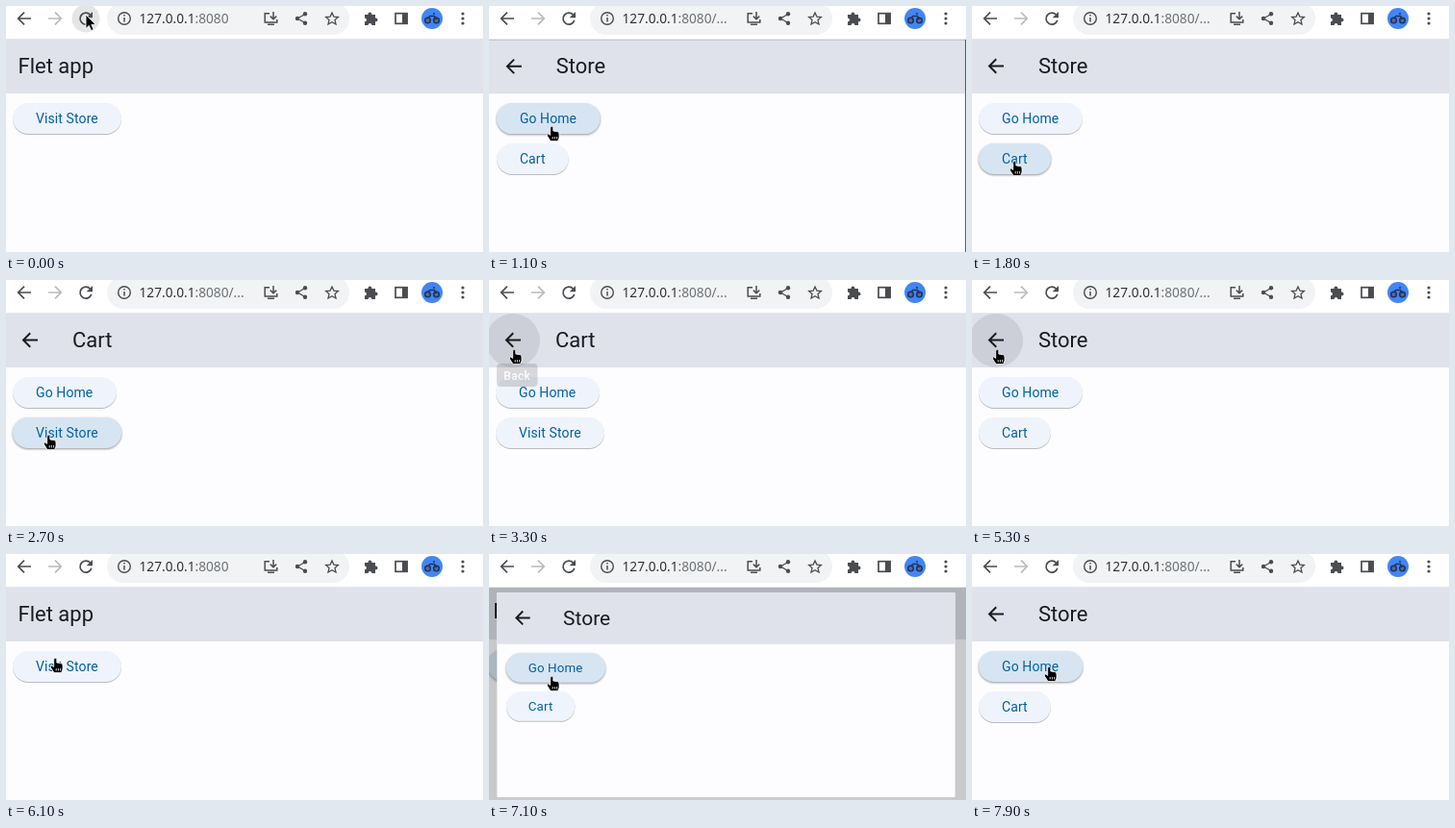
Recreate the animation shown at these times as an HTML page. Size 496x256 px, loop 8000 ms.

```html
<!DOCTYPE html>
<html lang="en">
<head>
<meta charset="utf-8">
<title>Routing demo</title>
<style>
  html, body { margin: 0; width: 100%; height: 100%; overflow: hidden; background: #fdfcff; }
  svg { display: block; }
  text { white-space: pre; }
  .title { font: 22px Roboto, sans-serif; fill: #1b1b1f; }
  .label { font: 14px Roboto, sans-serif; letter-spacing: .1px; fill: #0061a4; }
  .url { font: 13.7px "Noto Sans", sans-serif; fill: #303236; }
  .dim { fill: #6d7175; }
  .tip { font: 500 12px Roboto, sans-serif; fill: #fff; letter-spacing: .3px; }
  .line { fill: none; stroke: #4a4c50; stroke-width: 1.7; }
  .solid { fill: #4a4c50; }
</style>
</head>
<body>
<svg width="496" height="256" viewBox="0 0 496 256">
  <g id="pages"></g>
  <rect id="scrim" x="-3" y="35" width="502" height="224"/>

  <g id="toolbar">
    <rect width="496" height="35" fill="#fff"/>
    <rect y="34" width="496" height="1" fill="#e6e7ea"/>
    <path class="line" d="M26 13H13M19 6.7L12.7 13L19 19.3"/>
    <path class="line" style="stroke:#b9bbbe" d="M44 13H57M51 6.7L57.3 13L51 19.3"/>
    <circle id="reload" cx="83" cy="13" r="14.5" fill="#e4e5e7"/>
    <path class="line" d="M87.6 9.2A6 6 0 1 0 88.8 14.8"/>
    <path class="solid" d="M90 6V12.3H83.7Z"/>
    <rect x="105" y="-4" width="252" height="34" rx="17" fill="#f1f3f4"/>
    <circle class="line" cx="123" cy="13" r="6.3" style="stroke-width:1.4"/>
    <path class="line" style="stroke-width:1.5" d="M123 12V16.5M123 9V10.6"/>
    <text class="url" x="138.5" y="18">127.0.0.1<tspan class="dim">:8080<tspan id="path">/...</tspan></tspan></text>
    <path class="line" style="stroke-width:1.5" d="M274 7.7H269.2V17H281.8V14M272 19.3H279M278 6V13.5M274.8 10.6L278 13.8L281.2 10.6"/>
    <path class="line" style="stroke-width:1.3" d="M311 8.5L303 13L311 17.5"/>
    <g class="solid"><circle cx="311" cy="8.3" r="2.2"/><circle cx="303" cy="13" r="2.2"/><circle cx="311" cy="17.7" r="2.2"/></g>
    <path class="line" style="stroke-width:1.3" d="M339 7L340.9 11.1L345.4 11.6L342 14.6L343 19L339 16.7L335 19L336 14.6L332.6 11.6L337.1 11.1Z"/>
    <path class="solid" d="M373 9H376.5V8.3A1.9 1.9 0 0 1 380.3 8.3V9H384V12.5H384.6A1.9 1.9 0 0 1 384.6 16.3H384V20H380.4A1.9 1.9 0 0 0 376.6 20H373V16.3A1.9 1.9 0 0 0 373 12.5Z"/>
    <rect class="line" x="405" y="7.7" width="12" height="10.6"/>
    <rect class="solid" x="412" y="7" width="5.6" height="12"/>
    <circle cx="443" cy="13" r="11" fill="#4285f4"/>
    <g fill="#4f6f9f" stroke="#20345c" stroke-width="1.6"><circle cx="438.5" cy="15" r="2.8"/><circle cx="447.5" cy="15" r="2.8"/></g>
    <path fill="none" stroke="#20345c" stroke-width="1.6" d="M438.5 13L441 10.5H445.5L447.5 14M444 8H446"/>
    <g class="solid"><circle cx="475" cy="8" r="1.6"/><circle cx="475" cy="13" r="1.6"/><circle cx="475" cy="18" r="1.6"/></g>
  </g>

  <g id="tooltip">
    <rect x="8" y="87" width="42.5" height="24" rx="4" fill="#616161"/>
    <text class="tip" x="29.2" y="103.5" text-anchor="middle">Back</text>
  </g>

  <g id="arrow">
    <path d="M0 0V14.5L3.3 11.4L5.6 16.6L8.2 15.5L5.9 10.4H10.3Z" fill="#000" stroke="#fff" stroke-width=".9"/>
  </g>
  <g id="hand">
    <path d="M-1.3 1.3Q.3-.6 1.8 1.3V5L6.5 5.8Q8 6.3 8 8V12L6.6 15.6H-1L-4.4 10.3Q-5.2 8.2-3.2 8L-1.3 9.4Z" fill="#000" stroke="#fff" stroke-width=".8"/>
    <path d="M1.2 11V13.5M3.4 11V13.5M5.6 11V13.5" stroke="#fff" stroke-width=".8"/>
  </g>
</svg>

<script>
const $ = id => document.getElementById(id);
const LOOP = 8000, STEP = 100;
const clamp = v => Math.max(0, Math.min(1, v));
const mix = (a, b, p) => a + (b - a) * p;
const ramp = (t, a, b) => clamp((t - a) / (b - a));

function button(label, i, width) {
  const y = 101 + 42 * i;
  return `<rect class="btn" x="7" y="${y}" width="${width}" height="32" rx="16"/>
    <text class="label" x="31" y="${y + 21}">${label}</text>`;
}

function makeView(title, labels, hasBack) {
  const g = document.createElementNS('http://www.w3.org/2000/svg', 'g');
  g.innerHTML = `<rect x="-3" y="35" width="499" height="223" fill="#fdfcff"/>
    <rect x="-3" y="35" width="499" height="56" fill="#dfe2eb"/>
    ${hasBack ? `<circle class="back" cx="25" cy="63" r="28"/>
      <path d="M33 62.5H18.5M25.2 55.2L18 62.5L25.2 69.8" fill="none" stroke="#1b1b1f" stroke-width="2"/>` : ''}
    <text class="title" x="${hasBack ? 69 : 12.5}" y="70">${title}</text>
    ${labels.map(([text, w], i) => button(text, i, w)).join('')}`;
  $('pages').append(g);
  return { g, buttons: [...g.querySelectorAll('.btn')], back: g.querySelector('.back') };
}

const home = makeView('Flet app', [['Visit Store', 113]], false);
const store = makeView('Store', [['Go Home', 108], ['Cart', 75]], true);
const cart = makeView('Cart', [['Go Home', 108], ['Visit Store', 113]], true);
const views = [home, store, cart];

// start, view, leaves by popping
const routes = [
  [-1000, home], [916, store], [2316, cart], [3816, store], [5316, home, true], [7016, store]
];

// view, button index, hover start, hover end
const hovers = [
  [home, 0, 250, 1300], [store, 0, 900, 1550], [store, 1, 1600, 2600],
  [cart, 1, 2300, 2750], [home, 0, 6100, 7400], [store, 0, 6950, 8200]
];

// start, end, x, y of the pointer's hot spot
const moves = [
  [0, 400, 65, 125], [1500, 1800, 44, 161], [2700, 3200, 26, 73],
  [3200, 3300, 26, 72], [5900, 6300, 65, 127], [7700, 7900, 80, 117]
];

function bezier(x1, y1, x2, y2, x) {
  const at = (a, b, u) => 3 * (1 - u) * (1 - u) * u * a + 3 * (1 - u) * u * u * b + u ** 3;
  let lo = 0, hi = 1;
  for (let i = 0; i < 24; i++) {
    const mid = (lo + hi) / 2;
    if (at(x1, x2, mid) < x) lo = mid; else hi = mid;
  }
  return at(y1, y2, lo);
}

// two-part emphasised easing of the zoom page transition
function zoomEase(p) {
  const cut = 1 / 6;
  return p < cut
    ? .4 * bezier(.05, 0, .133333, .06, p / cut)
    : .4 + .6 * bezier(.208333, .82, .25, 1, (p - cut) / (1 - cut));
}

function place(view, scale, opacity) {
  view.g.style.display = '';
  view.g.setAttribute('opacity', opacity);
  view.g.setAttribute('transform', `translate(246 150) scale(${scale}) translate(-246 -150)`);
  $('pages').append(view.g);
}

function drawPages(t) {
  const n = routes.findLastIndex(r => r[0] <= t);
  const [start, view, pop] = routes[n];
  const p = ramp(t, start, start + 300), e = zoomEase(p);
  views.forEach(v => v.g.style.display = 'none');
  $('scrim').style.display = 'none';
  if (p >= 1) {
    place(view, 1, 1);
  } else if (pop) {
    place(view, mix(1.1, 1, e), 1);
    place(routes[n - 1][1], mix(1, .9, e), 1 - ramp(p, .0825, .2075));
  } else {
    place(routes[n - 1][1], mix(1, 1.05, e), 1);
    $('scrim').style.display = '';
    $('scrim').setAttribute('opacity', .6 * ramp(p, .2075, .4175));
    $('pages').append($('scrim'));
    place(view, mix(.85, 1, e), ramp(p, .125, .25));
  }
  return view;
}

function drawHover(t) {
  for (const v of views) {
    v.buttons.forEach((b, i) => {
      const h = Math.max(0, ...hovers.filter(r => r[0] === v && r[1] === i)
        .map(r => ramp(t, r[2], r[2] + 150) * (1 - ramp(t, r[3], r[3] + 150))));
      b.style.fill = `rgb(${mix(239, 215, h)},${mix(243, 229, h)},${mix(251, 242, h)})`;
      b.style.filter = `drop-shadow(0 1px ${mix(.7, 1.3, h)}px rgba(0,0,0,${mix(.26, .42, h)}))`;
    });
    if (v.back) v.back.setAttribute('opacity', .085 * ramp(t, 3000, 3200) * (1 - ramp(t, 5400, 5500)));
  }
}

function drawPointer(t, view) {
  let x = 83, y = 9;
  for (const [a, b, toX, toY] of moves) {
    const p = 1 - (1 - ramp(t, a, b)) ** 1.5;
    x = mix(x, toX, p);
    y = mix(y, toY, p);
  }
  const inside = (a, b) => y >= a && y <= b;
  const over = inside(101, 133) || view !== home && (inside(143, 175) || inside(35, 91) && x < 53);
  $('hand').style.display = over ? '' : 'none';
  $('arrow').style.display = over ? 'none' : '';
  $(over ? 'hand' : 'arrow').setAttribute('transform', `translate(${Math.round(x)} ${Math.round(y)})`);
}

function draw(t) {
  const view = drawPages(t);
  drawHover(t);
  drawPointer(t, view);
  $('reload').style.display = t < 200 ? '' : 'none';
  $('path').style.display = view === home || t < 1100 ? 'none' : '';
  $('tooltip').setAttribute('opacity', .9 * ramp(t, 3200, 3600) * (1 - ramp(t, 3820, 3980)));
}

function frame() {
  const t = performance.now() % LOOP;
  draw(Math.floor(t / STEP) * STEP);
  requestAnimationFrame(frame);
}
frame();
</script>
</body>
</html>
```
